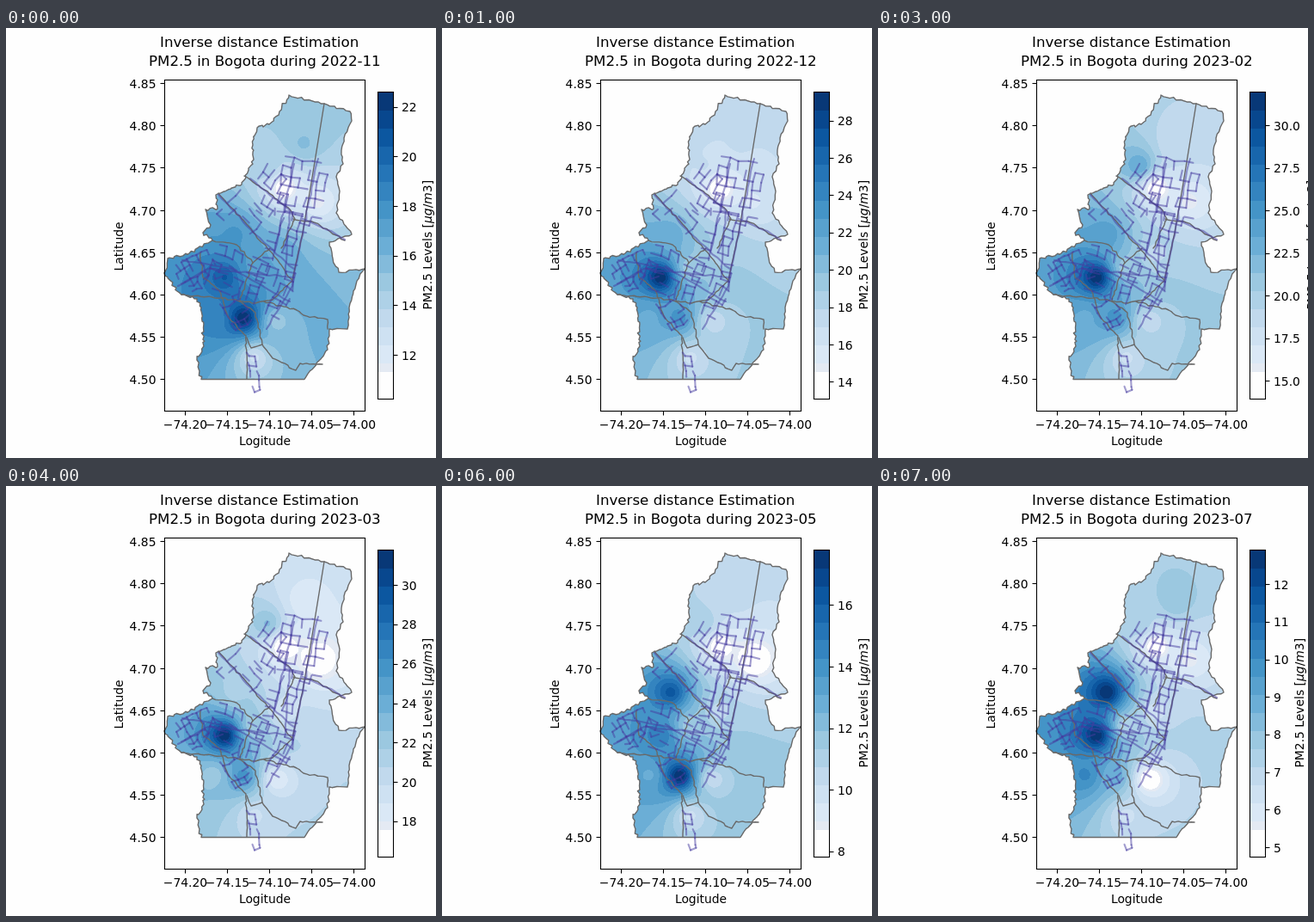
Write an HTML page with a canvas that moves like this. It is 500 by 500 pixels and loops after 8 s.

```html
<!DOCTYPE html>
<html lang="en">
<head>
<meta charset="utf-8">
<style>
html, body { margin: 0; width: 100%; height: 100%; overflow: hidden; background: #fefefe; }
canvas { display: block; }
</style>
</head>
<body>
<canvas id="stage" width="500" height="500"></canvas>
<script>
const ctx = document.getElementById('stage').getContext('2d');
const SANS = '"DejaVu Sans", sans-serif';
const LABEL = `13.89px ${SANS}`, TITLE = `16.67px ${SANS}`;
const MAP = { x: 184.5, y: 60.5, w: 233, h: 385 };
const BAR = { x: 432.5, y: 74.5, w: 18, h: 357 };
const BAND_COUNT = 34;

// Monitoring stations: position and usual reading, as a share of the colour scale.
const STATIONS = {
  west: { x: 254, y: 290, usual: 1 },
  south: { x: 276, y: 337, usual: .62 },
  park: { x: 323, y: 186, usual: .02 },
  northEast: { x: 362, y: 202, usual: .1 },
  farNorth: { x: 346, y: 134, usual: .24 },
  northWest: { x: 304, y: 160, usual: .34 },
  southEast: { x: 315, y: 341, usual: .25 },
  farSouth: { x: 289, y: 383, usual: .22 },
  southWest: { x: 241, y: 336, usual: .52 },
  airport: { x: 266, y: 240, usual: .5 },
  centre: { x: 322, y: 262, usual: .27 },
  midtown: { x: 289, y: 279, usual: .36 }
};

// Only the stations that stray from their usual reading are listed.
const MONTHS = [
  { date: '2022-11', lo: 10.23, hi: 22.62, step: 2,
    odd: { west: .83, south: 1, farNorth: .42, southEast: .38, southWest: .66, airport: .6, centre: .5, midtown: .57 } },
  { date: '2022-12', lo: 13.1, hi: 29.55, step: 2, odd: { northWest: .24, northEast: .17, centre: .33 } },
  { date: '2023-01', lo: 13.5, hi: 30.2, step: 2, odd: {} },
  { date: '2023-02', lo: 13.95, hi: 31.97, step: 2.5, odd: { northWest: .53, airport: .57 } },
  { date: '2023-03', lo: 16.2, hi: 31.8, step: 2,
    odd: { northWest: .42, northEast: .02, farNorth: .14, southEast: .12, southWest: .38, airport: .33, centre: .2 } },
  { date: '2023-04', lo: 10.88, hi: 22.84, step: 2,
    odd: { west: .46, south: 1, park: .18, northEast: 0, northWest: .45, southWest: .64, airport: .7 } },
  { date: '2023-05', lo: 7.83, hi: 17.8, step: 2, odd: { west: .7, south: 1, northEast: 0, airport: .85 } },
  { date: '2023-07', lo: 4.75, hi: 12.92, step: 1,
    odd: { south: .5, farNorth: .4, southEast: 0, southWest: .66, airport: 1, centre: .2, midtown: .3 } }
];

const BLUES = ['f7fbff', 'deebf7', 'c6dbef', '9ecae1', '6baed6', '4292c6', '2171b5', '08519c', '08306b']
  .map(hex => [0, 2, 4].map(i => parseInt(hex.slice(i, i + 2), 16)));

function blue(f) {
  const p = f * 8, i = Math.min(7, Math.floor(p));
  return BLUES[i].map((c, k) => Math.round(c + (BLUES[i + 1][k] - c) * (p - i)));
}

// The palest bands merge to white, then one grey band, then pairs of blue.
const BANDS = Array.from({ length: BAND_COUNT }, (_, i) =>
  i < 3 ? [254, 254, 254] : i === 3 ? [228, 234, 243] : blue((i - i % 2 + 1) / BAND_COUNT));
const bandOf = f => BANDS[Math.max(0, Math.min(BAND_COUNT - 1, Math.floor(f * BAND_COUNT)))];

let seed = 7;
function random() {
  seed = (seed * 1664525 + 1013904223) % 4294967296;
  return seed / 4294967296;
}
const spread = r => (random() * 2 - 1) * r;
const points = text => text.trim().split(/\s+/).map(p => p.split(',').map(Number));

// Splits a line into small steps with a slight wobble.
function rough(line, amount, step = 4) {
  const out = [line[0]];
  for (let i = 1; i < line.length; i++) {
    const [ax, ay] = line[i - 1], [bx, by] = line[i];
    const n = Math.max(1, Math.round(Math.hypot(bx - ax, by - ay) / step));
    for (let k = 1; k < n; k++) {
      out.push([ax + (bx - ax) * k / n + spread(amount), ay + (by - ay) * k / n + spread(amount)]);
    }
    out.push(line[i]);
  }
  return out;
}

function pathOf(line) {
  const path = new Path2D();
  line.forEach(([x, y], i) => i ? path.lineTo(x, y) : path.moveTo(x, y));
  return path;
}

const eastSide = points(`329,78 370,88 400,97 402,108 393,128 390,142 392,158 384,173 388,190
  384,215 402,240 376,249 380,268 387,284 417,280 407,298 399,325 397,350 376,350 374,374 347,408.5`);
const westSide = points(`227,408.5 222,386 230,370 227,325 222,315 204,310 185,288 188,268 213,262
  240,247 229,238 238,229 232,211 246,210 244,194 274,182 288,153 287,136 292,116 306,112 318,97 329,78`);
const outline = pathOf([...rough(eastSide, 1.2), ...rough(westSide, 1.6, 3)]);
outline.closePath();

const highway = pathOf(points('370,88 355,180 345,238 333,293'));
const districts = [
  '277,172 300,188 331,212 336,222 320,256',
  '334,222 358,226 394,247',
  '247,192 290,240 316,270 333,295',
  '240,247 268,252 287,273 307,256',
  '287,273 272,318',
  '204,310 250,314 290,320 310,316 333,294',
  '226,261 229,290 248,305 258,335 279,358 280,408',
  '272,318 290,331 298,368 310,384 337,398 342,390 368,391',
  '300,318 338,328 346,334 374,339 374,350',
  '280,360 285,372 298,368'
].map(d => pathOf(rough(points(d), 1)));

const avenues = ['363,152 340,262 333,300 303,350', '345,222 378,236 394,246', '335,158 310,270',
  '284,175 330,212 325,285', '247,194 290,240 335,280', '205,270 262,280 330,318', '200,300 235,280 335,290']
  .map(d => pathOf(rough(points(d), .9, 7)));

// A neighbourhood is a tilted street grid with some blocks left out.
function streets({ x, y, w, h, tilt, keep = .5, block = 10 }) {
  const cols = Math.round(w / block), rows = Math.round(h / block), out = [];
  const node = (i, j) => {
    const u = (i / cols - .5) * w + spread(1.4), v = (j / rows - .5) * h + spread(1.4);
    return [x + u * Math.cos(tilt) - v * Math.sin(tilt), y + u * Math.sin(tilt) + v * Math.cos(tilt)];
  };
  const grid = Array.from({ length: cols + 1 }, (_, i) => Array.from({ length: rows + 1 }, (_, j) => node(i, j)));
  for (let i = 0; i <= cols; i++) {
    for (let j = 0; j <= rows; j++) {
      for (const next of [grid[i + 1]?.[j], grid[i][j + 1]]) {
        if (next && random() < keep) out.push(pathOf([grid[i][j], next]));
      }
    }
  }
  return out;
}

const lanes = avenues.concat(...[
  { x: 345, y: 186, w: 52, h: 64, tilt: .16, keep: .55 },
  { x: 305, y: 190, w: 36, h: 50, tilt: .6, keep: .4 },
  { x: 323, y: 257, w: 42, h: 88, tilt: .26 },
  { x: 275, y: 218, w: 44, h: 40, tilt: .75, keep: .35 },
  { x: 222, y: 284, w: 46, h: 36, tilt: -.5, block: 7 },
  { x: 268, y: 286, w: 62, h: 50, tilt: .35 },
  { x: 268, y: 330, w: 24, h: 36, tilt: -.5, keep: .45, block: 8 },
  { x: 318, y: 318, w: 16, h: 38, tilt: .5 },
  { x: 288, y: 399, w: 8, h: 48, tilt: -.15, keep: .35, block: 6 }
].map(streets));

function layer(w, h, paint) {
  const canvas = document.createElement('canvas');
  canvas.width = w;
  canvas.height = h;
  paint(canvas.getContext('2d'));
  return canvas;
}

function estimate(readings, px, py) {
  let sum = 0, total = 0;
  for (const { x, y, value } of readings) {
    const weight = 1 / ((px - x) ** 2 + (py - y) ** 2 + 1);
    sum += weight * value;
    total += weight;
  }
  return sum / total;
}

function paintField({ odd }) {
  const readings = Object.entries(STATIONS).map(([name, { x, y, usual }]) => ({ x, y, value: odd[name] ?? usual }));
  const w = 234, h = 350;
  return layer(w, h, c => {
    const image = c.createImageData(w, h);
    for (let y = 0, i = 0; y < h; y++) {
      for (let x = 0; x < w; x++, i += 4) {
        image.data.set(bandOf(estimate(readings, x + MAP.x, y + MAP.y)), i);
        image.data[i + 3] = 255;
      }
    }
    c.putImageData(image, 0, 0);
  });
}

const network = layer(500, 500, c => {
  c.lineJoin = c.lineCap = 'round';
  c.strokeStyle = '#696969';
  c.lineWidth = 1.4;
  [outline, highway, ...districts].forEach(d => c.stroke(d));
  c.strokeStyle = 'rgba(70, 60, 160, .5)';
  c.lineWidth = 2.1;
  lanes.forEach(l => c.stroke(l));
});

function text(string, x, y, align = 'left', font = LABEL) {
  ctx.font = font;
  ctx.textAlign = align;
  ctx.fillText(string, x, y);
}

function rotated(x, y, draw) {
  ctx.save();
  ctx.translate(x, y);
  ctx.rotate(-Math.PI / 2);
  draw();
  ctx.restore();
}

function tick(x, y, dx, dy) {
  ctx.beginPath();
  ctx.moveTo(x, y);
  ctx.lineTo(x + dx, y + dy);
  ctx.stroke();
}

function drawAxes() {
  ctx.strokeRect(MAP.x, MAP.y, MAP.w, MAP.h);
  for (let i = 0; i < 8; i++) {
    const y = Math.round(64 + i * 49.2) + .5;
    tick(MAP.x, y, -5, 0);
    text((4.85 - i * .05).toFixed(2), 174.5, y + 5, 'right');
  }
  for (let i = 0; i < 5; i++) {
    const x = 208.5 + i * 49;
    tick(x, MAP.y + MAP.h, 0, 5);
    text('\u2212' + (74.2 - i * .05).toFixed(2), x, 466, 'center');
  }
  text('Logitude', 301, 485, 'center');
  rotated(135.5, 254, () => text('Latitude', 0, 0, 'center'));
}

function drawBar({ lo, hi, step }) {
  const bottom = BAR.y + BAR.h;
  BANDS.forEach((rgb, i) => {
    const y = Math.round(bottom - (i + 1) / BAND_COUNT * BAR.h);
    ctx.fillStyle = `rgb(${rgb})`;
    ctx.fillRect(BAR.x, y, BAR.w, Math.round(bottom - i / BAND_COUNT * BAR.h) - y);
  });
  ctx.strokeRect(BAR.x, BAR.y, BAR.w, BAR.h);
  ctx.fillStyle = '#000';
  const digits = step % 1 ? 1 : 0;
  for (let v = Math.ceil(lo / step) * step; v <= hi; v += step) {
    const y = bottom - (v - lo) / (hi - lo) * BAR.h;
    tick(BAR.x + BAR.w, Math.floor(y) + .5, 5, 0);
    text(v.toFixed(digits), 460, Math.round(y + 5));
  }
  rotated(digits ? 508.5 : 495, 327.5, () => {
    let x = 0;
    ['PM2.5 Levels [', 'μg', '/', 'm', '3]'].forEach((part, i) => {
      text(part, x, 0, 'left', (i % 2 ? 'italic ' : '') + LABEL);
      x += ctx.measureText(part).width;
    });
  });
}

function draw(month) {
  ctx.fillStyle = '#fefefe';
  ctx.fillRect(0, 0, 500, 500);
  month.field ??= paintField(month);
  ctx.save();
  ctx.clip(outline);
  ctx.drawImage(month.field, 184, 60);
  ctx.restore();
  ctx.drawImage(network, 0, 0);
  ctx.strokeStyle = ctx.fillStyle = '#000';
  ctx.lineWidth = 1.1;
  text('Inverse distance Estimation', 179, 22, 'left', TITLE);
  text('PM2.5 in Bogota during ' + month.date, 166, 44, 'left', TITLE);
  drawAxes();
  drawBar(month);
}

const start = performance.now();
let shown = -1;
function frame() {
  const index = Math.floor((performance.now() - start) / 1000) % MONTHS.length;
  if (index !== shown) draw(MONTHS[shown = index]);
  requestAnimationFrame(frame);
}
frame();
</script>
</body>
</html>
```
